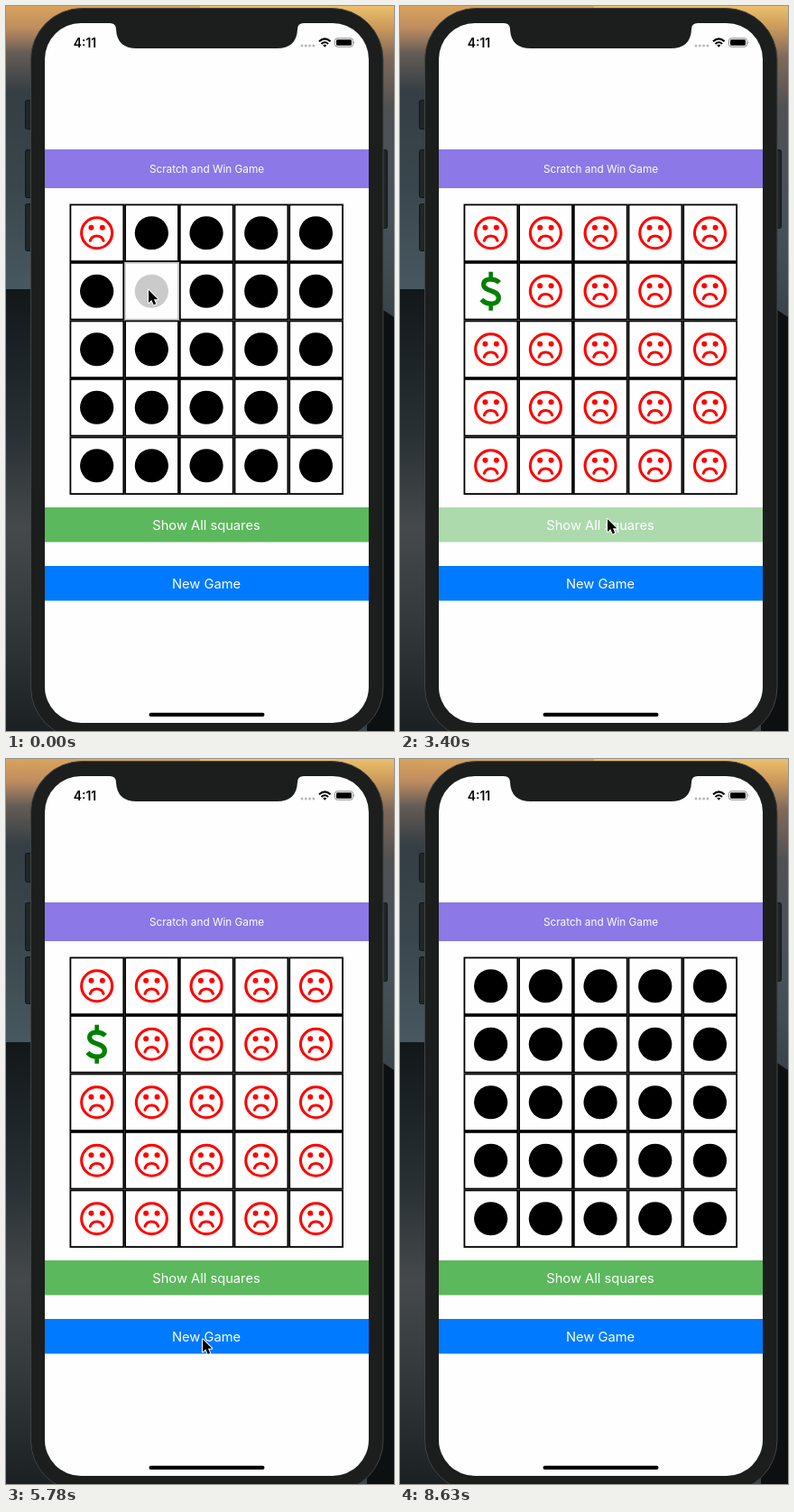
Write an HTML page that moves like this. It is 430 px wide and 804 px high and loops after 8730 ms.

```html
<!DOCTYPE html>
<html lang="en">
<head>
<meta charset="utf-8">
<title>Scratch and Win Game</title>
<style>
  html, body { margin: 0; width: 100%; height: 100%; overflow: hidden; background: #15191c; }
  svg { display: block; width: 430px; height: 804px; }
  text { font-family: Inter, sans-serif; text-anchor: middle; fill: #fff; }
  .label { font-size: 14.7px; }
</style>
</head>
<body>
<svg viewBox="0 0 430 804">
  <defs>
    <linearGradient id="leftSky" x2="0" y2="1">
      <stop offset="0" stop-color="#d9a35c"/>
      <stop offset=".03" stop-color="#c08d60"/>
      <stop offset=".065" stop-color="#655c56"/>
      <stop offset=".12" stop-color="#343e44"/>
      <stop offset=".25" stop-color="#3a464d"/>
      <stop offset=".39" stop-color="#485860"/>
      <stop offset=".391" stop-color="#12171a"/>
      <stop offset=".5" stop-color="#1e2528"/>
      <stop offset=".6" stop-color="#2b3235"/>
      <stop offset=".72" stop-color="#45494c"/>
      <stop offset=".85" stop-color="#33393b"/>
      <stop offset="1" stop-color="#1b2022"/>
    </linearGradient>
    <linearGradient id="rightSky" x2="0" y2="1">
      <stop offset="0" stop-color="#ecc06c"/>
      <stop offset=".03" stop-color="#cb995b"/>
      <stop offset=".07" stop-color="#80695a"/>
      <stop offset=".14" stop-color="#505153"/>
      <stop offset=".3" stop-color="#46515a"/>
      <stop offset=".42" stop-color="#3a454b"/>
    </linearGradient>
    <g id="dot"><circle r="18.6"/></g>
    <g id="sad" fill="none" stroke="#f00" stroke-width="3.1" stroke-linecap="round">
      <circle r="17"/>
      <path d="M-7.3 8.5A7.7 7.7 0 0 1 7.3 8.5"/>
      <g fill="#f00" stroke="none"><circle cx="-6.2" cy="-6" r="3"/><circle cx="6.2" cy="-6" r="3"/></g>
    </g>
    <g id="dollar" fill="none" stroke="#008000" stroke-width="5.2">
      <path d="M9.5 -9.5C5 -14 -8 -15.5 -8 -7.5C-8 1 8.7 -2 8.7 7.3C8.7 16 -5 15.5 -10.3 9.3"/>
      <path d="M0 -21.5V-13M0 13V21.5" stroke-width="4.6"/>
    </g>
  </defs>

  <rect width="215" height="804" fill="url(#leftSky)"/>
  <rect x="215" width="215" height="804" fill="url(#rightSky)"/>
  <path d="M400 325L430 345V804H400Z" fill="#0c1011"/>

  <g fill="#202526" stroke="#111516">
    <rect x="21.5" y="104.500" width="8" height="32" rx="2"/>
    <rect x="21.5" y="159.500" width="8" height="53" rx="2"/>
    <rect x="21.5" y="219.500" width="8" height="52" rx="2"/>
    <rect x="415" y="159.500" width="7.500" height="87" rx="2"/>
  </g>
  <rect x="27.500" y="2.500" width="390.500" height="810" rx="57" fill="#1b1e1d" stroke="#414444"/>
  <rect x="43" y="19" width="359" height="776" rx="40" fill="#fefefe"/>
  <path d="M115 18V19Q122 19 122 26Q123 47 145 47H300Q322 47 323 26Q323 19 330 19V18Z" fill="#1b1e1d"/>

  <text x="87.500" y="45.500" style="font-size:13.8px;font-weight:600;fill:#000">4:11</text>
  <g fill="#b8b8b8">
    <circle cx="328" cy="44" r="1.500"/><circle cx="332.300" cy="44" r="1.500"/>
    <circle cx="336.600" cy="44" r="1.500"/><circle cx="340.900" cy="44" r="1.500"/>
  </g>
  <g fill="none" stroke="#000" stroke-width="2">
    <path d="M347 39.300Q353.300 33.500 359.600 39.300M349.500 42Q353.300 38.500 357.100 42"/>
  </g>
  <path d="M351.200 43.500Q353.300 41.800 355.400 43.500L353.300 45.800Z"/>
  <rect x="364.500" y="35.800" width="20" height="9.400" rx="2.600" fill="none" stroke="#888"/>
  <rect x="366" y="37.300" width="17" height="6.400" rx="1.300"/>
  <path d="M385.700 39Q387.500 40.500 385.700 42Z" fill="#888"/>

  <rect x="43" y="159" width="359" height="43" fill="#8c78e6"/>
  <text x="222.500" y="185" style="font-size:11.75px">Scratch and Win Game</text>
  <g id="board"></g>
  <g id="showAll">
    <rect x="43" y="556" width="359" height="38.500" fill="#5cb85c"/>
    <text class="label" x="222" y="580.800">Show All squares</text>
  </g>
  <g id="newGame">
    <rect x="43" y="621" width="359" height="38.500" fill="#007aff"/>
    <text class="label" x="222" y="645.600">New Game</text>
  </g>
  <rect x="158.500" y="783.800" width="128" height="4.200" rx="2.100"/>
  <path id="cursor" d="M0 0V14L3.300 11L5.700 16.400L8.200 15.300L5.900 10.200H10.300Z"
        stroke="#fff" stroke-width="2" stroke-linejoin="round" paint-order="stroke"/>
</svg>
<script>
const LOOP = 8730, STEP = 148.1, SIZE = 5;
const CELL_W = 60.7, CELL_H = 64.5;
const WINNER = 5, REVEAL = 23, RESET = 43;

// Step at which a square is touched and then opened, by square index.
const scratches = { 0: [-1, 0], 6: [0, 2], 12: [5, 7], 16: [11, 13], 22: [14, 16], 23: [17, 19] };

// Cursor waypoints: step, x, y.
const path = [
  [0, 158, 315], [1, 158, 315], [2, 165, 322], [4, 215, 376], [6, 216, 378],
  [8, 182, 398], [9, 170, 405], [11, 157, 440], [13, 158, 442], [14, 213, 497],
  [15, 214, 498], [16, 258, 499], [17, 267, 499], [19, 267, 499], [21, 232, 566],
  [22, 230, 569], [24, 230, 569], [25, 226, 560], [28, 108, 318], [32, 106, 320],
  [33, 142, 462], [35, 218, 643.5], [46, 218, 643.5], [52, 358, 806]
];

const byId = id => document.getElementById(id);
const within = (step, from, to) => step >= from && step < to;

function make(tag, attrs, parent) {
  const node = document.createElementNS("http://www.w3.org/2000/svg", tag);
  for (const key in attrs) node.setAttribute(key, attrs[key]);
  return parent.appendChild(node);
}

const cells = Array.from({ length: SIZE * SIZE }, (_, i) => {
  const x = 70.5 + (i % SIZE) * CELL_W;
  const y = 219.5 + Math.floor(i / SIZE) * CELL_H;
  const group = make("g", { transform: `translate(${x} ${y})` }, byId("board"));
  make("rect", { x: .9, y: .9, width: CELL_W - 1.8, height: CELL_H - 1.8,
                 fill: "#fefefe", stroke: "#000", "stroke-width": 1.8 }, group);
  const icon = make("use", { transform: `translate(${CELL_W / 2 - .2} ${CELL_H / 2})` }, group);
  return { group, icon };
});

function cursorAt(step) {
  const next = path.findIndex(point => point[0] > step);
  if (next < 0) return path[path.length - 1].slice(1);
  const [s0, x0, y0] = path[next - 1], [s1, x1, y1] = path[next];
  const k = (step - s0) / (s1 - s0);
  return [x0 + (x1 - x0) * k, y0 + (y1 - y0) * k];
}

function render(time) {
  const step = Math.max(0, Math.floor((time % LOOP - 130) / STEP) + 1);
  cells.forEach(({ group, icon }, i) => {
    const [touched, opened] = scratches[i] || [REVEAL, REVEAL];
    const shown = within(step, opened, RESET);
    icon.setAttribute("href", !shown ? "#dot" : i === WINNER ? "#dollar" : "#sad");
    group.setAttribute("opacity", within(step, touched, opened) ? .2 : 1);
  });
  byId("showAll").setAttribute("opacity", within(step, 22, 25) ? .5 : 1);
  byId("newGame").setAttribute("opacity", within(step, 40, 44) ? .5 : 1);
  byId("cursor").setAttribute("transform", `translate(${cursorAt(step)})`);
}

const start = performance.now();
function tick() {
  render(performance.now() - start);
  requestAnimationFrame(tick);
}
tick();
</script>
</body>
</html>
```
